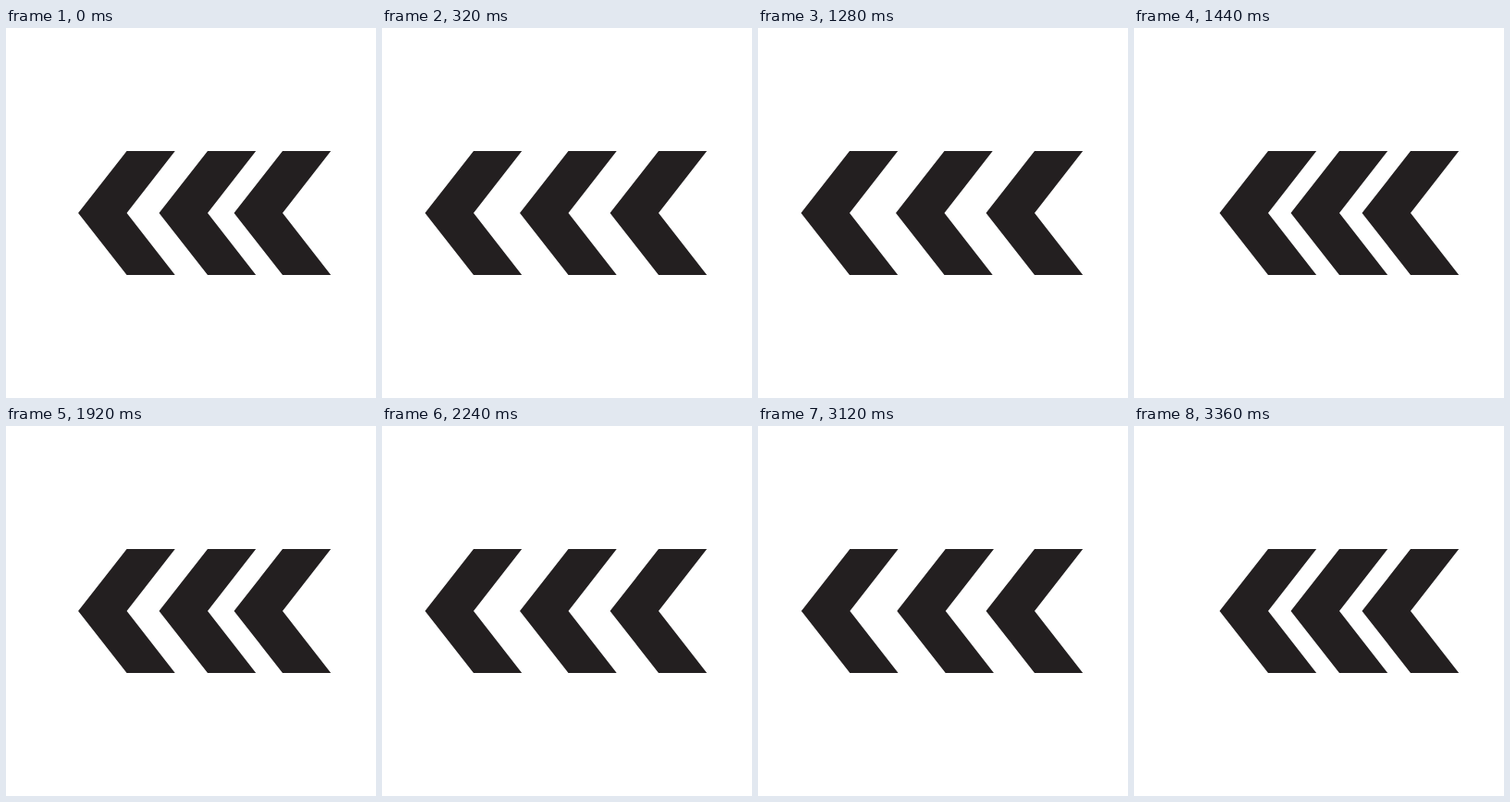
Animation of 400x400 px, one loop 3.84 s. Source, as an HTML page:

```html
<!DOCTYPE html>
<html>
<head>
<meta charset="utf-8">
<style>
html, body { margin: 0; height: 100%; overflow: hidden; background: #fff; }
svg { display: block; width: 100vw; height: 100vh; }
</style>
</head>
<body>
<svg viewBox="0 0 400 400" fill="#231f20">
  <defs><path id="chevron" d="M0 67 52.5 0H104.7L52.5 67 104.7 134H52.5Z"/></defs>
  <use id="left" href="#chevron" y="133"/>
  <use id="middle" href="#chevron" y="133"/>
  <use href="#chevron" x="246.5" y="133"/>
</svg>
<script>
const PERIOD = 960, STEP = 40, OUT = 9, BACK = 4;
const left = document.getElementById('left');
const middle = document.getElementById('middle');
const start = performance.now();

// Decelerate outwards, then spring back smoothly and rest.
function spread(step, power) {
  if (step <= OUT) return 1 - (1 - step / OUT) ** power;
  const u = Math.min(1, (step - OUT) / BACK);
  return 1 - u * u * (3 - 2 * u);
}

function draw(now) {
  const time = Math.max(0, now - start) % PERIOD;
  const step = Math.floor(time / STEP) + 1;
  left.setAttribute('x', 92.5 - 46 * spread(step, 3.2));
  middle.setAttribute('x', 169.5 - 20.5 * spread(step, 1.85));
  requestAnimationFrame(draw);
}
draw(start);
</script>
</body>
</html>
```
